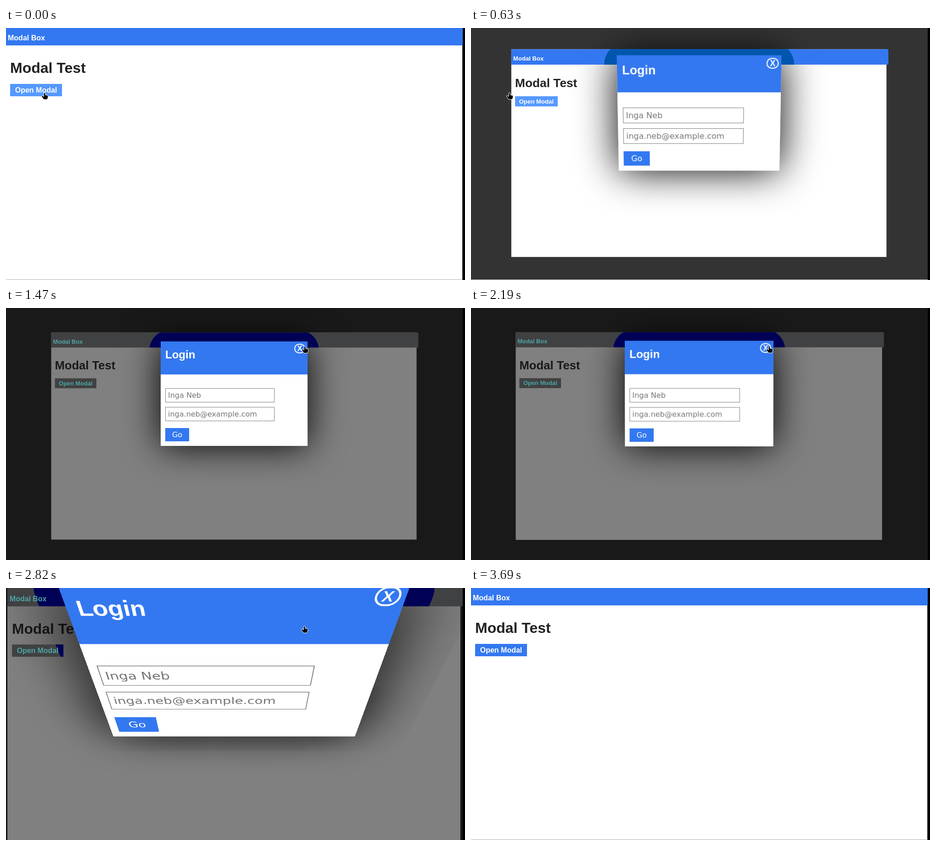
Write an HTML page that moves like this. It is 1000 px wide and 550 px high and loops after 4.8 s.

```html
<!DOCTYPE html>
<html lang="en">
<head>
<meta charset="utf-8">
<title>Modal Box</title>
<style>
html, body { margin: 0; width: 100%; height: 100%; overflow: hidden; }
#stage {
  --bg: #333; --paper: #fff; --bar: #3378f0; --button: #3378f0;
  --ink: #222; --label: #fff; --shade: #0055ad; --line: #aaa; --height: 552px;
  position: relative; width: 1000px; height: 550px; overflow: hidden;
  background: var(--bg); font: bold 16px "Liberation Sans", Arial, sans-serif; white-space: nowrap;
}
#stage.open { --line: #e6dfe1; }
#stage.hover { --button: #5599ff; }
#stage.dim {
  --bg: #191919; --paper: #808080; --bar: #404143; --button: #404141;
  --ink: #191919; --label: #4fa3a3; --shade: #000055; --line: #25171d; --height: 565px;
}
#stage div { position: absolute; box-sizing: border-box; }
#stage .page { left: -1px; top: -3px; width: 995px; height: var(--height); }
.bar { left: 0; top: 0; width: 1000px; height: 41px; }
.button { left: 10px; top: 125px; width: 113px; height: 27px; line-height: 27px; text-align: center; }
.bars div { background: var(--button); }
.bars .bar { background: var(--bar); }
.labels { color: var(--label); }
.labels .bar { left: 5px; line-height: 50px; }
.title { left: 10px; top: 70px; font-size: 32px; line-height: 40px; color: var(--ink); }
#clip { inset: 0; }
.flip { left: 337px; top: 73px; width: 320px; height: 228px; }
.glow { box-shadow: 0 0 80px #000; }
.halo { inset: -25px; border-radius: 45px; background: var(--shade); }
.modal { background: #fff; }
.head { left: 0; top: 0; width: 320px; height: 72px; background: #3378f0; color: #fff; }
.login { left: 10px; top: 14px; font-size: 24px; line-height: 30px; }
.close {
  left: 291px; top: 5px; width: 24px; height: 21px; line-height: 17px;
  border: 2px solid #fff; border-radius: 12px; text-align: center;
}
.field, .go { left: 10px; font: 16px "DejaVu Sans", sans-serif; }
.field { width: 238px; height: 31px; padding-left: 5px; line-height: 29px; border: 1px solid #808080; color: #757575; }
.go { top: 189px; width: 52px; height: 29px; line-height: 29px; background: #3378f0; color: #fff; text-align: center; }
#line { left: 0; top: 549px; width: 995px; height: 1px; background: var(--line); }
#edge { left: 995px; top: 0; width: 5px; height: 550px; background: #000; }
svg { position: absolute; left: 0; top: 0; overflow: visible; }
</style>
</head>
<body>
<div id="stage">
  <div id="line"></div>
  <div class="page" style="background: var(--paper)"><div class="title">Modal Test</div></div>
  <div class="flip glow"></div>
  <div class="page bars"><div class="bar"></div><div class="button"></div></div>
  <div id="clip"><div class="flip"><div class="halo"></div></div></div>
  <div class="page labels"><div class="bar">Modal Box</div><div class="button">Open Modal</div></div>
  <div class="flip modal">
    <div class="head"><div class="login">Login</div><div class="close">X</div></div>
    <div class="field" style="top: 102px">Inga Neb</div>
    <div class="field" style="top: 143px">inga.neb@example.com</div>
    <div class="go">Go</div>
  </div>
  <div id="edge"></div>
  <svg width="1" height="1"><path id="cursor" stroke="#fff"/></svg>
</div>
<script>
const LOOP = 4800, OPEN = 160, DIM = 895, LEAVE = 3280, GONE = 3690;
const HAND = 'M-1.8 1Q0-1 1.8 1V5L7 6.3Q8.2 7 7.6 10L6 15H-2L-6 9Q-7.5 6.5 -5 6.3L-1.8 8.5Z';
const ARROW = 'M0 0V16L4 12.5L7 19L9.5 18L7 11.5H11.5Z';
const stage = document.getElementById('stage');
const clip = document.getElementById('clip');
const cursor = document.getElementById('cursor');
const pages = document.querySelectorAll('.page');
const flips = document.querySelectorAll('.flip');

const clamp = x => Math.min(1, Math.max(0, x));
const mix = (a, b, k) => a + (b - a) * k;

// CSS "ease": cubic-bezier(.25, .1, .25, 1)
function ease(x) {
  if (x <= 0 || x >= 1) return clamp(x);
  const bezier = (a, b, u) => 3 * a * u * (1 - u) ** 2 + 3 * b * u * u * (1 - u) + u ** 3;
  let lo = 0, hi = 1;
  for (let i = 0; i < 24; i++) {
    const mid = (lo + hi) / 2;
    if (bezier(.25, .25, mid) < x) lo = mid; else hi = mid;
  }
  return bezier(.1, 1, lo);
}

// 1 = page at full size, 0 = modal at rest
function awayness(t) {
  if (t < OPEN || t >= LEAVE) return 1;
  if (t < DIM) return 1 - ease((t - 142) / 800);
  return ease((Math.min(t, 2820) - 2172) / 870);
}

function pointer(t) {
  if (t < 720) return [84, 141];
  if (t < 1430) {
    const left = 1 - clamp((t - 720) / 510);
    return [mix(656, 84, left ** 3.25), mix(86, 141, left ** 2.25)];
  }
  if (t < 1470) return [653, 84.5];
  if (t < 1610) return [651, 83.5];
  const k = clamp((t - LEAVE) / (GONE - LEAVE));
  return [mix(650, 1004, k), mix(83, 150, k)];
}

function draw(t) {
  const open = t >= OPEN && t < LEAVE, dim = open && t >= DIM;
  const away = awayness(t), zoom = .8 + .2 * away, size = 1 + away;
  stage.className = dim ? 'dim' : (open ? 'open ' : '') + (t < DIM ? 'hover' : '');

  for (const page of pages) page.style.transform = `scale(${zoom})`;
  for (const flip of flips) {
    flip.style.visibility = open ? 'visible' : 'hidden';
    flip.style.transform =
      `perspective(800px) scale3d(${size},${size},${size}) rotateX(${-45 * away}deg)`;
  }

  // The dark halo only tints the bar and the button.
  const midY = dim ? 279.5 : 273;
  const px = x => mix(496.5, x, zoom), py = y => mix(midY, y, zoom);
  const rect = (x, y, w, h) => `M${px(x)} ${py(y)}H${px(x + w)}V${py(y + h)}H${px(x)}Z`;
  clip.style.clipPath = `path("${rect(-1, -3, 1000, 41)}${rect(9, 122, 113, 27)}")`;

  const [x, y] = pointer(t);
  const hand = t < 720 || (x > 628 && t < LEAVE);
  cursor.setAttribute('d', hand ? HAND : ARROW);
  cursor.setAttribute('transform', `translate(${x} ${y})`);
  cursor.style.display = t < GONE ? '' : 'none';
}

const start = performance.now();
function tick() {
  draw((performance.now() - start) % LOOP);
  requestAnimationFrame(tick);
}
tick();
</script>
</body>
</html>
```
